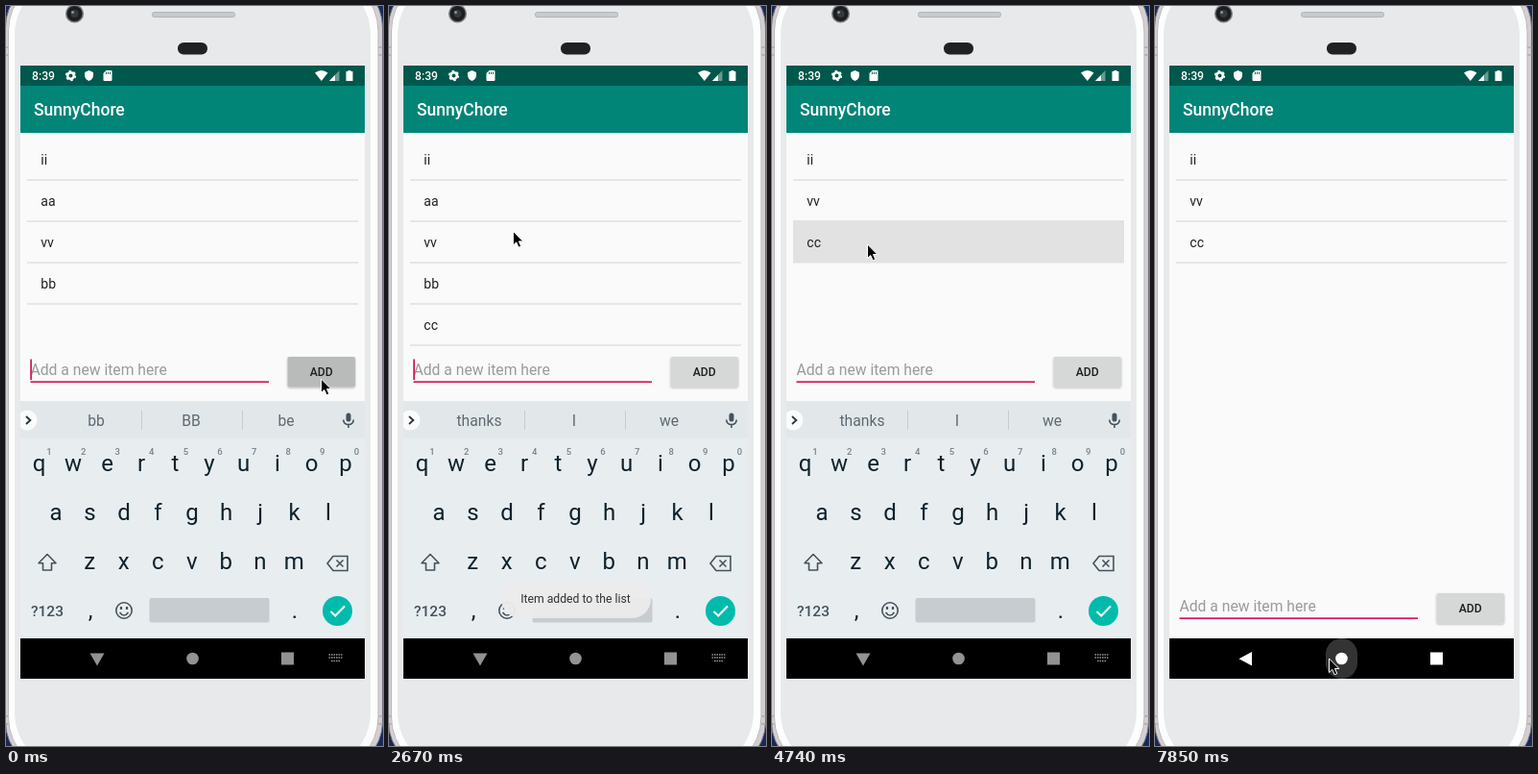
Write an HTML page that moves like this. It is 393 by 770 pixels and loops after 8 s.

```html
<!DOCTYPE html>
<html lang="en">
<head>
<meta charset="utf-8">
<title>Todo list demo</title>
<style>
  html, body { margin: 0; width: 100%; height: 100%; overflow: hidden; background: #1b2c5c; }
  svg { display: block; width: 100%; height: 100%; font-family: Roboto, sans-serif; }
  .mid { text-anchor: middle; }
  .medium { font-weight: 500; }
  .key { font-size: 24px; fill: #0d222c; }
  .digit { font-size: 9.5px; font-weight: 500; fill: #78838a; }
  .word { font-size: 15.7px; fill: #5d6a72; }
  .line { fill: none; stroke: #44535b; stroke-width: 1.6; }
</style>
</head>
<body>
<svg viewBox="0 0 393 770">
  <defs>
    <clipPath id="screen"><rect x="15" y="62" width="359" height="638"/></clipPath>
    <filter id="shadow" x="-10%" y="-20%" width="120%" height="150%">
      <feDropShadow dx="0" dy="1" stdDeviation="1" flood-opacity=".28"/>
    </filter>
  </defs>

  <!-- phone body -->
  <rect width="393" height="770" fill="#18295a"/>
  <rect x="-.5" y="-28" width="393" height="823" rx="50" fill="#d5cfd2" stroke="#77757f"/>
  <path d="M0 43H4M0 51H4M388 43H393M388 51H393M0 739H4M0 747H4M388 739H393M388 747H393" stroke="#9b979c"/>
  <rect x="2.500" y="-32" width="385.500" height="830" rx="58" fill="#fcfdfd" stroke="#bbb9bf"/>
  <rect x="9" y="-30" width="371" height="825" rx="60" fill="#e7e9eb"/>
  <circle cx="71.500" cy="8" r="9.500" fill="#77797b"/>
  <circle cx="71.500" cy="8" r="8" fill="#1d1e20"/>
  <circle cx="71.500" cy="8" r="4" fill="#34393f"/>
  <circle cx="69.500" cy="6.500" r="1.500" fill="#8d959c"/>
  <rect x="152.500" y="6.500" width="86" height="5" rx="2" fill="#c6cbd0" stroke="#a9adb2" stroke-width=".8"/>
  <rect x="179" y="38" width="31" height="12.500" rx="6.200" fill="#202122"/>

  <g clip-path="url(#screen)">
    <rect x="15" y="62" width="359" height="638" fill="#fafafa"/>
    <rect x="15" y="83" width="359" height="49" fill="#008577"/>
    <rect x="15" y="62" width="359" height="21" fill="#00574b"/>
    <g fill="#fff">
      <text class="medium" x="27" y="77" font-size="12.200">8:39</text>
      <circle cx="67.500" cy="72.500" r="3.300" fill="none" stroke="#fff" stroke-width="2.600"/>
      <circle cx="67.500" cy="72.500" r="4.900" fill="none" stroke="#fff" stroke-width="1.500" stroke-dasharray="2.600 2.530"/>
      <path d="M86.500 67L91 69V72.500Q90.500 76.500 86.500 78Q82.500 76.500 82 72.500V69Z"/>
      <path d="M104.500 67H109.500Q110.500 67 110.500 68V77Q110.500 78 109.500 78H102.500Q101.500 78 101.500 77V70Z"/>
      <path d="M104.500 68.500V71M106.500 68.500V71M108.500 68.500V71" stroke="#00574b" stroke-width=".9"/>
      <path d="M322 69.500Q328.800 64.500 335.500 69.500L328.800 78Z"/>
      <path d="M347.500 67V78H337Z" opacity=".4"/>
      <path d="M343 71.800V78H337Z"/>
      <path d="M354.500 68H356.500V67H359.500V68H361.500V78H354.500Z"/>
      <text class="medium" x="29" y="114" font-size="17.500">SunnyChore</text>
    </g>

    <g id="rows" font-size="14" fill="#212121"></g>

    <g id="entry">
      <text id="hint" x="25.500" y="384" font-size="15.700" fill="#9b9b9b">Add a new item here</text>
      <text id="typed" x="26" y="384" font-size="15.700" fill="#212121"></text>
      <rect id="typedLine" x="26" y="385.500" height="1" fill="#212121"/>
      <rect x="25.500" y="390.300" width="248.500" height="1.700" fill="#d81b60"/>
      <rect id="caret" y="367.500" width="1.800" height="21.500" fill="#d81b60"/>
      <rect id="button" x="293.500" y="365" width="70.500" height="31.500" rx="1.800" filter="url(#shadow)"/>
      <text class="mid medium" x="328.700" y="385" font-size="12.200" fill="#1f1f1f">ADD</text>
    </g>

    <rect x="15" y="658" width="359" height="42"/>
    <rect id="backRipple" x="51" y="658" width="88" height="42" rx="21" fill="#fff"/>
    <rect id="homeRipple" y="658" height="42" fill="#fff" opacity=".2"/>
    <g id="nav">
      <path id="backIcon"/>
      <circle cx="194.500" cy="679" r="6.300"/>
      <rect x="287" y="672.500" width="13" height="13"/>
      <path id="switchIcon" d="M336.500 675H350.500M336.500 678H350.500M339 681.500H348" stroke="#929292" stroke-width="1.500" stroke-dasharray="1.600 .9"/>
    </g>

    <g id="keyboard">
      <rect x="15" y="411" width="359" height="247" fill="#e8edf0"/>
      <rect x="15" y="411" width="359" height="38.500" fill="#e2e7ea"/>
      <circle cx="22" cy="431" r="10.500" fill="#fafbfb"/>
      <path d="M21 427L25.300 431L21 435" fill="none" stroke="#26343b" stroke-width="1.900"/>
      <g id="words"><path d="M141.500 421V441M246.500 421V441" stroke="#c5cbcf"/></g>
      <rect x="354.500" y="423.500" width="5" height="9" rx="2.500" fill="#44535b"/>
      <path class="line" d="M351.700 430.500Q352 435.500 357 435.500Q362 435.500 362.300 430.500M357 435.500V439"/>
      <g id="keys"></g>
      <path class="line" d="M43 570.500L52 579.800H47.500V587H38.500V579.800H34Z" stroke-linejoin="round"/>
      <path class="line" d="M341 572.500H356V587.500H341L335 580ZM344.500 576.500L351.500 583.500M351.500 576.500L344.500 583.500"/>
      <text class="mid medium" x="43" y="634.500" font-size="15.500" fill="#44535b">?123</text>
      <circle class="line" cx="123" cy="629" r="8.200"/>
      <path class="line" d="M118.500 631Q123 637 127.500 631"/>
      <path d="M120 625V628M126 625V628" stroke="#44535b" stroke-width="2.200"/>
      <rect x="149.500" y="616" width="125" height="25.500" rx="2" fill="#c7ccd0"/>
      <circle cx="345.500" cy="629.500" r="15.500" fill="#00bbab"/>
      <path d="M338.500 630L343.200 634.500L353 624.500" fill="none" stroke="#fff" stroke-width="2"/>
    </g>

    <g id="toast">
      <rect x="117" y="597" width="156" height="40" rx="20" fill="#ededed" opacity=".95"/>
      <text class="mid" x="194.500" y="621" font-size="12.200" fill="#323232">Item added to the list</text>
    </g>
  </g>
  <path id="pointer" d="M0 0V14.500L3.300 11.500L5.700 16.800L8.300 15.600L6 10.500H10.400Z" stroke="#fff" stroke-width="1"/>
</svg>

<script>
const LOOP = 8000, STEP = 148.2, ROW_TOP = 138, ROW_HEIGHT = 43;
const $ = id => document.getElementById(id);
const set = (el, attrs) => { for (const name in attrs) el.setAttribute(name, attrs[name]); };
const show = (el, visible) => el.setAttribute('visibility', visible ? 'visible' : 'hidden');

function add(parent, tag, attrs, text = '') {
  const el = document.createElementNS('http://www.w3.org/2000/svg', tag);
  set(el, attrs);
  el.textContent = text;
  parent.append(el);
  return el;
}

// Letter keys: text, first centre, baseline
for (const [letters, x, y] of [['qwertyuiop', 34.5, 484], ['asdfghjkl', 52, 535], ['zxcvbnm', 87.3, 586]])
  [...letters].forEach((c, i) => add($('keys'), 'text', { class: 'mid key', x: x + 35.5 * i, y }, c));
[...'1234567890'].forEach((c, i) =>
  add($('keys'), 'text', { class: 'mid digit', x: 45 + 35.6 * i, y: 467 }, c));
add($('keys'), 'text', { class: 'mid key', x: 88, y: 637 }, ',');
add($('keys'), 'text', { class: 'mid key', x: 301, y: 637 }, '.');

const words = [94, 193, 292].map(x => add($('words'), 'text', { class: 'mid word', x, y: 437 }));
const rows = [0, 1, 2, 3, 4].map(i => {
  const y = ROW_TOP + ROW_HEIGHT * i;
  return {
    press: add($('rows'), 'rect', { x: 22, y: y - .7, width: 345, height: ROW_HEIGHT + 1.2 }),
    divider: add($('rows'), 'rect', { x: 22, y: y + 42.3, width: 345, height: 1.4, fill: '#dedede' }),
    label: add($('rows'), 'text', { x: 36.3, y: y + 27 })
  };
});

// Each track lists [start time, value]
const lists = [[0, 'ii aa vv bb'], [2200, 'ii aa vv bb cc'], [3550, 'ii vv bb cc'], [4580, 'ii vv cc']];
const suggestions = [[0, 'bb BB be'], [140, 'thanks I we'], [1470, 'cc CC can'], [2365, 'thanks I we'], [6300, '']];
const edits = [[-100, ''], [1320, 'c'], [1470, 'cc'], [2200, '']];
const pointerPath = [
  [0, 328.5, 388], [150, 328.5, 388], [1030, 146, 575], [1500, 146, 575], [2000, 343, 372], [2225, 343, 372],
  [2370, 235, 340], [2815, 93, 198], [3560, 93, 198], [3900, 99.5, 248], [5040, 99.5, 248],
  [6080, 93, 679], [7400, 93, 679], [7850, 181.5, 679]
];

const last = (track, t) => track.findLast(entry => entry[0] <= t);
const ramp = (t, from, to) => Math.min(1, Math.max(0, (t - from) / (to - from)));
const pulse = (t, a, b, c, d) => ramp(t, a, b) * (1 - ramp(t, c, d));

function pointerAt(t) {
  const from = last(pointerPath, t);
  const to = pointerPath[pointerPath.indexOf(from) + 1] || from;
  const p = to === from ? 0 : ramp(t, from[0], to[0]);
  const eased = p * p * (3 - 2 * p);
  return [1, 2].map(k => from[k] + (to[k] - from[k]) * eased);
}

function draw(t) {
  const items = last(lists, t)[1].split(' ');
  const presses = [0, pulse(t, 3000, 3240, 3650, 3850), pulse(t, 4000, 4240, 4700, 4880)];
  rows.forEach(({ label, divider, press }, i) => {
    const level = presses[i] || 0;
    const grey = 250 - 31 * level;
    label.textContent = items[i] || '';
    show(divider, i < items.length && !level);
    show(press, level > 0);
    set(press, { fill: `rgb(${grey}, ${grey}, ${grey})` });
  });

  const [editTime, text] = last(edits, t);
  const textWidth = 8.2 * text.length;
  $('typed').textContent = text;
  set($('typedLine'), { width: textWidth });
  show($('hint'), !text);
  show($('caret'), (t - editTime) % 1000 < 500);
  set($('caret'), { x: 25.2 + textWidth });
  set($('button'), { fill: t < 140 || (t > 2200 && t < 2365) ? '#b9bbbb' : '#d6d7d7' });
  set($('entry'), { transform: `translate(0 ${t > 6300 ? 246 : 0})` });

  const choices = last(suggestions, t)[1].split(' ');
  words.forEach((word, i) => word.textContent = choices[i] || '');
  show($('words'), t < 6300);
  const hide = ramp(t, 6225, 6423);
  set($('keyboard'), { transform: `translate(0 ${51 * hide})`, opacity: 1 - hide });

  const closing = t > 6200;
  set($('nav'), { fill: closing ? '#fff' : '#929292' });
  set($('backIcon'), { d: closing ? 'M101 672V686.500L87.500 679.200Z' : 'M87.500 673.500H102.500L95 686.500Z' });
  show($('switchIcon'), !closing);
  set($('backRipple'), { opacity: .2 * pulse(t, 6050, 6250, 6400, 6800) });
  const width = 88 * ramp(t, 7700, 8110);
  set($('homeRipple'), { x: 194.5 - width / 2, width, rx: Math.min(21, width / 2) });

  set($('toast'), { opacity: pulse(t, 150, 450, 2120, 2400) + pulse(t, 2400, 2650, 4450, 4735) });
  set($('pointer'), { transform: `translate(${pointerAt(t)})` });
}

function frame() {
  const t = performance.now() % LOOP;
  draw(Math.floor((t + 8) / STEP) * STEP);
  requestAnimationFrame(frame);
}
frame();
</script>
</body>
</html>
```
